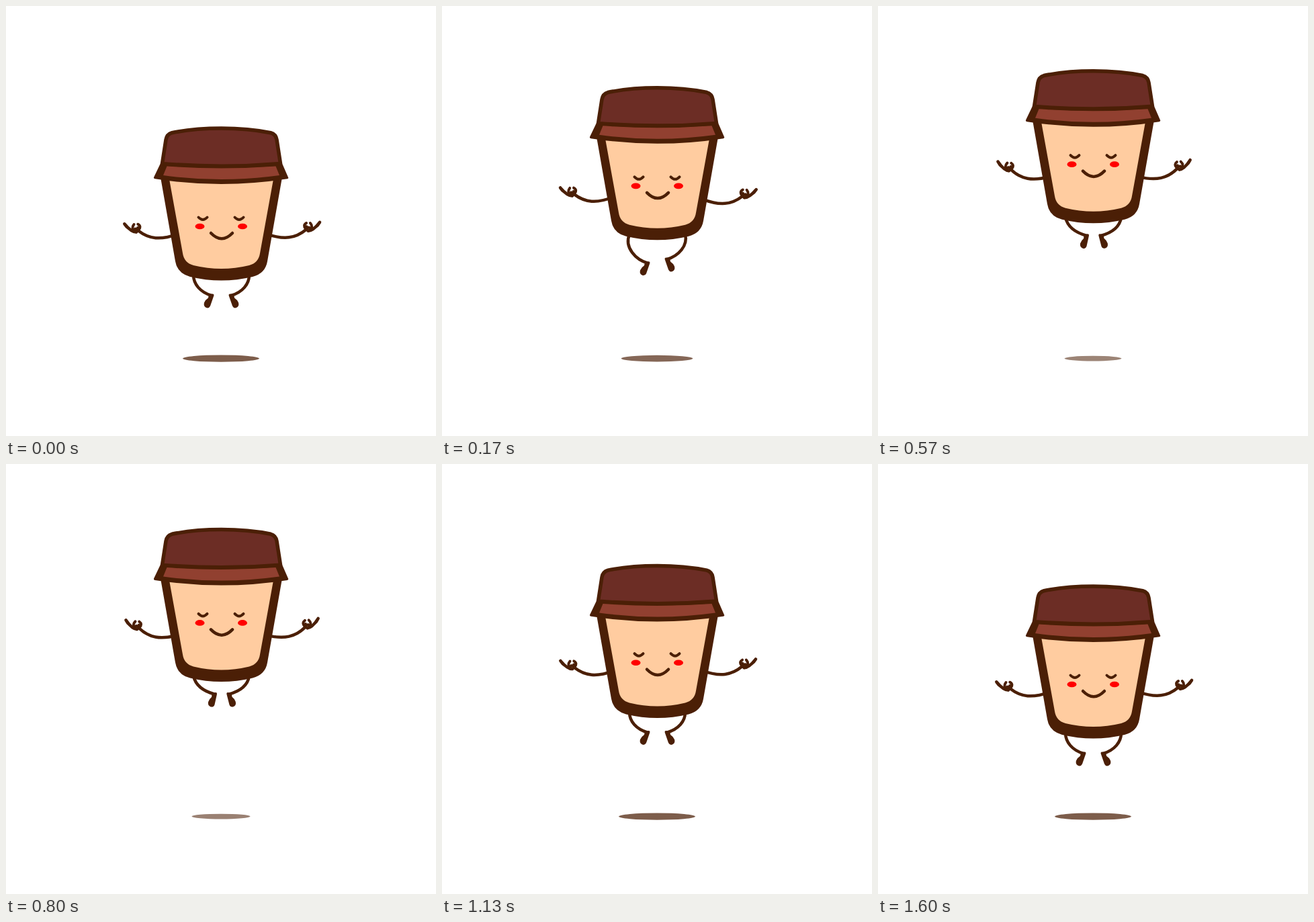
Recreate the animation shown at these times as an HTML page. Size 640x640 px, loop 1.93 s.

```html
<!DOCTYPE html>
<html lang="en">
<head>
<meta charset="utf-8">
<title>Floating cup</title>
<style>
  html, body { margin: 0; width: 100%; height: 100%; overflow: hidden; background: #fff; }
  svg { display: block; width: 100vw; height: 100vh; }
  .line { fill: none; stroke: #4b1f06; stroke-width: 4.5; stroke-linecap: round; stroke-linejoin: round; }
  .dark { fill: #4b1f06; }
</style>
</head>
<body>
<svg viewBox="0 0 640 640">
  <defs>
    <g id="arm" class="line">
      <path d="M256 339 C230 349 213 347 197 334.500"/>
      <path d="M176.300 324.300 Q179 329 184 332 M177 325 Q187 337 194 336.500"/>
      <path stroke-width="4" d="M190.500 325 Q185.500 331 192 335.500 M196.300 324.800 Q202 328 197.500 333.500 L194 336.500 M192.500 331.500 Q195.500 333 196 330"/>
    </g>
    <path id="foot" class="dark" d="M-4 -2 L2 -2.500 Q4 -2 3.200 0.500 L-2 15.500 Q-4 19.500 -8 18 Q-12.500 16 -11 10.500 Q-9 6 -5 3.500 Z"/>
  </defs>

  <ellipse id="shadow" class="dark" cx="320" cy="524.600"/>

  <g id="cup">
    <use id="armL" href="#arm"/>
    <g transform="translate(644 0) scale(-1 1)"><use id="armR" href="#arm"/></g>
    <g><path id="legL" class="line"/><use id="footL" href="#foot"/></g>
    <g transform="translate(641 0) scale(-1 1)"><path id="legR" class="line"/><use id="footR" href="#foot"/></g>

    <path class="dark" d="M229.500 252 L252 380 Q255 398 274 403 Q320.500 414 367 403 Q386 398 389 380 L411.500 252 Z"/>
    <path fill="#ffcca0" d="M242.700 256 L263 368 Q265 382 279 386 Q320.500 396 362 386 Q376 382 378 368 L398.300 256 Z"/>
    <path class="dark" d="M231 232 L220 255 Q219.500 257 222 257.300 Q320.500 272.700 418.500 257.300 Q421 257 420 255 L410 232 Z"/>
    <path fill="#914030" d="M239.500 238.500 Q320.500 244.500 401.500 238.500 L407 252 Q320.500 264 234 252 Z"/>
    <path class="line" style="fill:#6c2d25;stroke-width:5.500" d="M232.500 234.500 L238 199 Q239.300 191 247 188.700 Q280 182 320.500 182 Q361 182 394 188.700 Q401.700 191 403 199 L408.500 234.500 Q320.500 242 232.500 234.500 Z"/>

    <g id="face">
      <ellipse cx="288.500" cy="328" rx="7" ry="4.300" fill="#f00"/>
      <ellipse cx="352" cy="328" rx="7" ry="4.300" fill="#f00"/>
      <path class="line" style="stroke-width:4" d="M286.500 314.500 Q293 321.500 299.500 314.500 M340.500 314.500 Q347 321.500 353.500 314.500"/>
      <path class="line" d="M305 338 Q321 354.500 337 338"/>
    </g>
  </g>
</svg>
<script>
const LOOP = 1930, PEAK = 15;   // PEAK and s count steps of 1/25 s
const el = id => document.getElementById(id);
const set = (id, attrs) => {
  for (const name in attrs) el(id).setAttribute(name, attrs[name]);
};
const part = (s, a, b) => Math.min(1, Math.max(0, (s - a) / (b - a)));
const ease = (s, a, b) => { const u = part(s, a, b); return u * u * (3 - 2 * u); };

// Fast start and soft arrival, then an accelerating fall.
function height(s) {
  if (s < PEAK) return 86.5 * (1 - Math.exp(-.297 * s));
  return Math.max(0, 86 - 21 * Math.pow((s - PEAK) / 10, 3.7));
}

// Limbs trail the jump, float up at the top and recoil after landing.
const drag = s => Math.pow(s / 3 * Math.exp(1 - s / 3), 3);
const float = s => ease(s, 4, 9) * (1 - ease(s, 20, 27));
const recoil = s => Math.sin(Math.PI * part(s, 26, 40));

function limbs(side, s, m) {
  const d = drag(s), f = float(s), r = recoil(s);
  const armY = m.arm * d - f - 2 * r;
  const raise = m.tilt + 5.5 * f - m.swing * d;
  set('arm' + side, { transform: `translate(0 ${armY}) rotate(${raise} 247 343)` });

  const dx = m.tuck * f, dy = m.leg * d - 4 * f - 2 * r;
  const x = 306 + dx, y = 431 + dy, bow = m.leg * d;
  set('leg' + side, {
    d: `M279 400 C${279 - bow * .7 + dx * .6} ${414 + dy * .5} ${289 + dx * .5} ${426 + dy} ${x} ${y}`
  });
  set('foot' + side, { transform: `translate(${x} ${y}) rotate(${-dx * 1.4})` });
}

function draw(t) {
  // 25 steps a second shown at 30: every sixth picture repeats.
  const shown = Math.floor((t + 3.4) * .03);
  const s = shown - Math.floor((shown + 3) / 6);

  const shrink = ease(s, 0, 12) * (1 - Math.pow(part(s, PEAK, 27), 3));
  const rx = 57 - 14.5 * shrink;
  set('shadow', { rx, ry: rx * .09, opacity: .72 - .17 * shrink });

  set('cup', { transform: `translate(0 ${-height(s)})` });
  const faceY = -7.2 * ease(s, 4, 12) * (1 - ease(s, 20, 25)) - 4 * recoil(s);
  set('face', { transform: `translate(0 ${faceY})` });

  limbs('L', s, { arm: 6, swing: 1, tilt: 0, leg: 13.5, tuck: 4.7 });
  limbs('R', s, { arm: 10, swing: 2.5, tilt: 2, leg: 7, tuck: 3.3 });
}

const start = performance.now();
function tick() {
  draw((performance.now() - start) % LOOP);
  requestAnimationFrame(tick);
}
tick();
</script>
</body>
</html>
```
